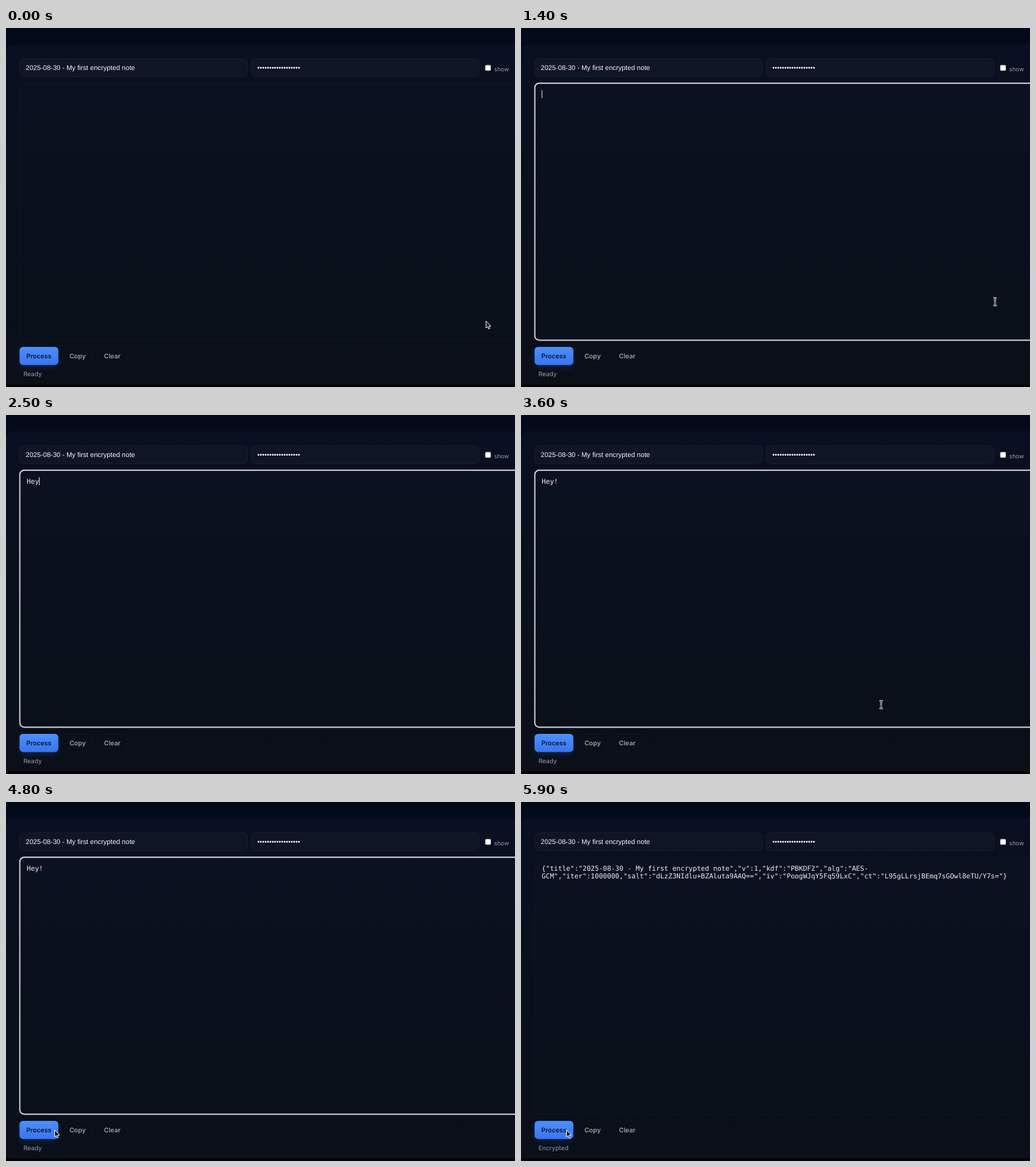
Animation of 800x564 px, one loop 6900 ms. Source, as an HTML page:

```html
<!DOCTYPE html>
<html lang="en">
<head>
<meta charset="utf-8">
<title>Encrypted note</title>
<style>
  html, body { margin: 0; width: 100%; height: 100%; overflow: hidden; background: #030a1a; }
  svg { display: block; width: 100vw; height: 100vh; }
  text { text-rendering: geometricPrecision; white-space: pre; }
  .field { font: 10.67px "Liberation Sans", Arial, sans-serif; fill: #f3f5f9; }
  .mono { font: 10.67px "DejaVu Sans Mono", monospace; fill: #eef1f6; }
  .ui { font: 9.75px Inter, sans-serif; fill: #969ca8; }
  .button { font: 600 10.1px Inter, sans-serif; fill: #9ba1ad; }
  .box { fill: #101526; stroke: #171c2c; }
  .ghost { fill: #0a0f19; stroke: #0e141f; }
</style>
</head>
<body>
<svg viewBox="0 0 800 564">
  <defs>
    <linearGradient id="page" x2="0" y2="1">
      <stop stop-color="#020918"/><stop offset="1" stop-color="#030c1d"/>
    </linearGradient>
    <linearGradient id="panel" x2="0" y2="1">
      <stop stop-color="#081021"/><stop offset=".5" stop-color="#09101d"/><stop offset="1" stop-color="#0a0f18"/>
    </linearGradient>
    <linearGradient id="area" x2="0" y2="1">
      <stop stop-color="#0a1120"/><stop offset="1" stop-color="#0a1019"/>
    </linearGradient>
    <linearGradient id="primary" x2="0" y2="1">
      <stop stop-color="#4c90fc"/><stop offset="1" stop-color="#3975ef"/>
    </linearGradient>
    <filter id="blur" x="-50%" y="-50%" width="200%" height="200%"><feGaussianBlur stdDeviation="5"/></filter>
  </defs>

  <rect width="800" height="28" fill="url(#page)"/>
  <rect y="20" width="12" height="20" fill="#030b1b"/>
  <path d="M.5 564V38Q.5 27 11 27H801V564Z" fill="url(#panel)" stroke="#0b1222"/>
  <rect y="560" width="800" height="4" fill="#050209"/>

  <rect class="box" x="21.5" y="48.5" width="358" height="28" rx="6"/>
  <rect class="box" x="385.5" y="48.5" width="358" height="28" rx="6"/>
  <text class="field" x="31" y="66">2025-08-30 - My first encrypted note</text>
  <text class="field" x="395" y="66">••••••••••••••••••</text>
  <rect x="753.2" y="58.2" width="8.8" height="8.8" rx="1.6" fill="#fff" stroke="#767676" stroke-width=".6"/>
  <text class="ui" x="767.3" y="67.6" style="font-size:9.2px">show</text>

  <rect x="21.5" y="86.5" width="800" height="404" rx="7" fill="url(#area)" stroke="#0e1523"/>
  <rect id="ring" x="21.7" y="86.7" width="800" height="403.8" rx="7" fill="none" stroke="#d3d7db" stroke-width="1.9"/>
  <text class="mono" id="line1" x="32.6" y="107.8"></text>
  <text class="mono" id="line2" x="32.6" y="120.2"></text>
  <rect id="caret" y="97.7" width="1" height="12.5" fill="#e8ebf0"/>

  <rect x="23" y="507" width="58" height="26" rx="6" fill="#2f6fe8" opacity=".22" filter="url(#blur)"/>
  <rect x="21.3" y="501" width="61" height="28.4" rx="5.5" fill="url(#primary)"/>
  <rect class="ghost" x="89" y="501.5" width="47.5" height="28" rx="5.5"/>
  <rect class="ghost" x="143.5" y="501.5" width="47" height="28" rx="5.5"/>
  <text class="button" x="32" y="518.7" style="fill:#0a1530">Process</text>
  <text class="button" x="99.7" y="518.7">Copy</text>
  <text class="button" x="154" y="518.7">Clear</text>
  <text class="ui" id="status" x="27.4" y="546.8"></text>

  <g id="pointer">
    <path id="arrow" d="M.5 .5V11.2L3 8.9L4.6 12.8L6.4 12L4.8 8.3H8Z" fill="#05070c" stroke="#fff" stroke-width="1"/>
    <g id="beam" fill="none">
      <path d="M-2.6 -6Q0 -6 0 -4.5V4.5Q0 6 -2.6 6M2.6 -6Q0 -6 0 -4.5M2.6 6Q0 6 0 4.5M-1.4 2H1.4" stroke="#e8eaee" stroke-width="2.6"/>
      <path d="M-2.6 -6Q0 -6 0 -4.5V4.5Q0 6 -2.6 6M2.6 -6Q0 -6 0 -4.5M2.6 6Q0 6 0 4.5M-1.4 2H1.4" stroke="#10141c" stroke-width=".9"/>
    </g>
  </g>
</svg>
<script>
const LOOP = 6900, STEP = 100, CHAR = 6.423;
const FOCUS = 1400, CLICK = 5200, DONE = 5500, BLINK = 500;
const KEYS = [2200, 2400, 2500, 2900];
const CIPHER = [
  '{"title":"2025-08-30 - My first encrypted note","v":1,"kdf":"PBKDF2","alg":"AES-',
  'GCM","iter":1000000,"salt":"dLzZ3NIdlu+BZAluta9AAQ==","iv":"PoogWJqY5Fq59LxC","ct":"L95gLLrsjBEmq7sGOwl8eTU/Y7s="}'
];
// time, x, y
const PATH = [
  [0, 754, 460], [700, 746, 433], [1100, 745, 430], [3100, 745, 430],
  [3400, 676, 436], [3600, 566, 455], [3800, 350, 496], [4000, 135, 538],
  [4100, 101, 533], [4400, 86, 515], [4600, 86, 515], [4900, 71, 515], [LOOP, 71, 515]
];
const el = id => document.getElementById(id);
const show = (id, on) => el(id).setAttribute("visibility", on ? "inherit" : "hidden");

function pointerAt(t) {
  const i = PATH.findIndex(p => p[0] > t);
  const [t0, x0, y0] = PATH[i - 1], [t1, x1, y1] = PATH[i];
  const k = (t - t0) / (t1 - t0);
  return [x0 + (x1 - x0) * k, y0 + (y1 - y0) * k];
}

function draw(t) {
  const typed = KEYS.filter(k => k <= t);
  const focused = t >= FOCUS && t < CLICK;
  const done = t >= DONE;
  el("line1").textContent = done ? CIPHER[0] : "Hey!".slice(0, typed.length);
  el("line2").textContent = done ? CIPHER[1] : "";
  el("status").textContent = done ? "Encrypted" : "Ready";
  show("ring", focused);

  // the blink restarts with every key
  const since = t - (typed.at(-1) ?? FOCUS);
  show("caret", focused && Math.floor(since / BLINK) % 2 === 0);
  el("caret").setAttribute("x", 32.5 + typed.length * CHAR);

  const [x, y] = pointerAt(t);
  const overText = t > 0 && y < 490;
  el("pointer").setAttribute("transform", `translate(${x} ${y})`);
  show("pointer", t < KEYS[0] || t >= 3100);
  show("beam", overText);
  show("arrow", !overText);
}

const start = performance.now();
function tick() {
  const t = (performance.now() - start) % LOOP;
  draw(Math.floor(t / STEP) * STEP);
  requestAnimationFrame(tick);
}
tick();
</script>
</body>
</html>
```
